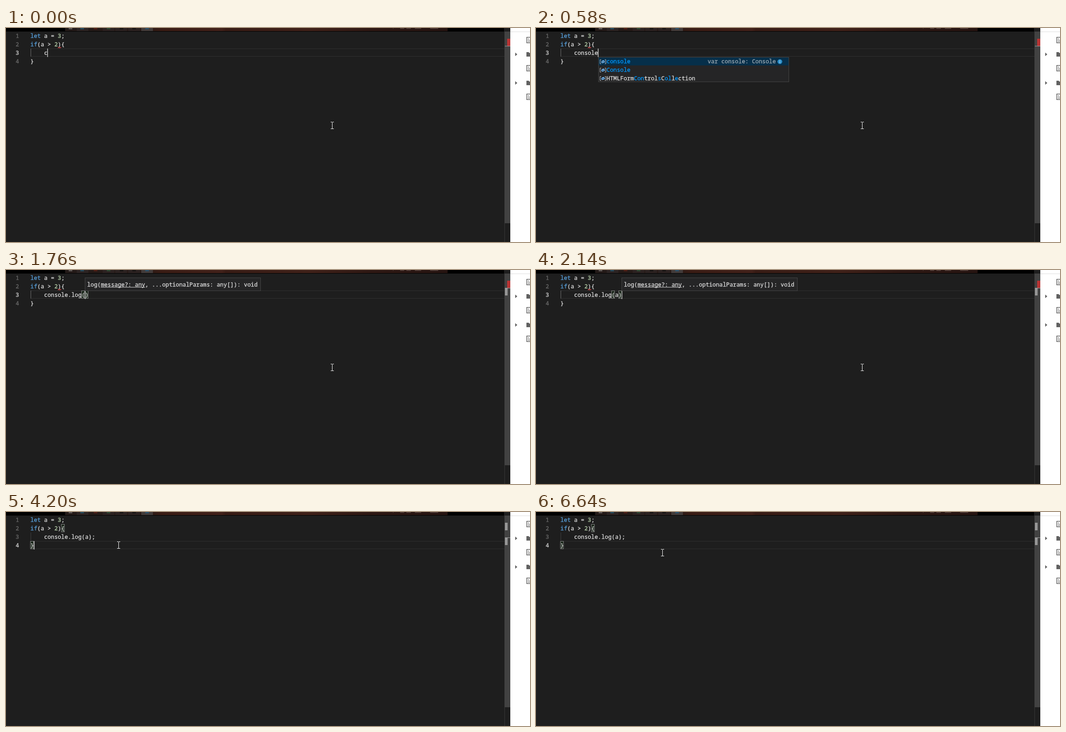
These frames come from a looping animation (1170 by 479 pixels, 7.08 s). An HTML page with a canvas:

```html
<!DOCTYPE html>
<html lang="en">
<head>
<meta charset="utf-8">
<title>Code editor</title>
<style>
html, body { margin: 0; width: 100%; height: 100%; overflow: hidden; background: #1e1e1e; }
canvas { display: block; }
</style>
</head>
<body>
<canvas id="stage" width="1170" height="479"></canvas>
<script>
const ctx = document.getElementById('stage').getContext('2d');
const LOOP = 7080, FRAME = 73.75;
const CODE = '12.7px "Noto Sans Mono", monospace';
const MENU = '11.45px "Open Sans", sans-serif';
const CHAR = 7.62, ROW = 19, TOP = 8, LEFT = 54.6;
const TEXT = '#dadada', BLUE = '#569cd6', NUMBER = '#b5cea8';

const colX = col => LEFT + col * CHAR;
const rowY = row => TOP + (row - 1) * ROW;

const globals = ('console const continue confirm case catch class clearInterval clearTimeout close closed ' +
  'caches Comment Console CompositionEvent ConvolverNode ConstantSourceNode CountQueuingStrategy ' +
  'HTMLFormControlsCollection').split(' ');
const members = 'assert clear count debug dir dirxml error exception group groupCollapsed groupEnd info log'.split(' ');
const locals = ('a alert addEventListener arguments atob async await Array ArrayBuffer ' +
  'AbortController Animation Attr Audio').split(' ');
const details = {
  console: 'var console: Console',
  assert: '(method) Console.assert(test?: boolean, message?: string): void',
  log: '(method) Console.log(message?: any, ...optionalParams: any[]): void',
  a: 'let a: number'
};

// Typed text over time; "|" marks a caret that is not at the end.
const typing = [
  [0, 'c'], [60, 'c', globals], [140, 'co', globals], [220, 'con', globals],
  [360, 'cons', globals], [440, 'conso', globals], [500, 'consol', globals],
  [580, 'console', globals], [960, 'console.'], [1020, 'console.', members],
  [1240, 'console.l', members], [1400, 'console.lo', members], [1460, 'console.log', members],
  [1620, 'console.log(|)'], [1700, 'console.log(|)', null, true],
  [1840, 'console.log(a|)', null, true], [1920, 'console.log(a|)', locals, true],
  [2060, 'console.log(a)', null, true], [2360, 'console.log(a);']
];

const menuItems = [
  [89, 'Save code', 'Ctrl+S'], [118.7, 'Switch theme', ''], [148.4, 'Go to Definition', 'Ctrl+F12'],
  [178.2, 'Peek Definition', 'Alt+F12'], [208, 'Find All References', 'Shift+F12'],
  [237.8, 'Go to Symbol...', 'Ctrl+Shift+O'], [259.5], [282.4, 'Change All Occurrences', 'Ctrl+F2'],
  [312.2, 'Format Document', 'Shift+Alt+F'], [333.5], [356.7, 'Cut', ''], [386.5, 'Copy', ''],
  [408.5], [431.2, 'Command Palette', 'F1']
];

function rect(x, y, w, h, color) {
  ctx.fillStyle = color;
  ctx.fillRect(x, y, w, h);
}

function frame(x, y, w, h, color) {
  ctx.strokeStyle = color;
  ctx.lineWidth = 1;
  ctx.strokeRect(x + .5, y + .5, w - 1, h - 1);
}

// A hairline stroke gives the glyphs the weight of hinted screen text.
function text(str, x, y, color = TEXT, font = CODE, align = 'left') {
  ctx.font = font;
  ctx.fillStyle = ctx.strokeStyle = color;
  ctx.textAlign = align;
  ctx.lineWidth = .35;
  ctx.fillText(str, x, y);
  ctx.strokeText(str, x, y);
}

function poly(points, fill, stroke, width = 1) {
  ctx.beginPath();
  points.forEach(([x, y]) => ctx.lineTo(x, y));
  if (fill) {
    ctx.closePath();
    ctx.fillStyle = fill;
    ctx.fill();
  }
  if (stroke) {
    ctx.strokeStyle = stroke;
    ctx.lineWidth = width;
    ctx.stroke();
  }
}

function codeLine(row, ...tokens) {
  let col = 0;
  for (const [str, color] of tokens) {
    text(str, colX(col), rowY(row) + 14, color);
    col += str.length;
  }
}

// Letters of word matched by query, starting at a word boundary; null if none.
function fuzzy(word, query) {
  const lower = word.toLowerCase();
  for (let start = 0; start < word.length; start++) {
    if (start && !/[A-Z]/.test(word[start])) continue;
    if (query && lower[start] !== query[0]) continue;
    const hits = new Set();
    let at = start - 1;
    for (const ch of query) {
      at = lower.indexOf(ch, at + 1);
      if (at < 0) break;
      hits.add(at);
    }
    if (hits.size === query.length) return hits;
  }
  return null;
}

function variableIcon(x, y) {
  poly([[x + 3, y - 4.5], [x + .5, y - 4.5], [x + .5, y + 4.5], [x + 3, y + 4.5]], null, '#c5c5c5');
  poly([[x + 11, y - 4.5], [x + 13.5, y - 4.5], [x + 13.5, y + 4.5], [x + 11, y + 4.5]], null, '#c5c5c5');
  poly([[x + 3, y - 1], [x + 8, y - 3.5], [x + 11.5, y - 1.5], [x + 11.5, y + 1], [x + 6, y + 3.5], [x + 3, y + 1.5]], '#75beff');
  poly([[x + 3.5, y - .5], [x + 6.5, y + .8], [x + 11, y - 1.2]], null, '#1e1e1e');
}

function methodIcon(x, y) {
  const hex = [[7, -6], [12, -3], [12, 3], [7, 6], [2, 3], [2, -3], [7, -6]];
  poly(hex.map(([dx, dy]) => [x + dx, y + dy]), null, '#b180d7', 1.4);
  poly([[x + 2, y - 3], [x + 7, y], [x + 12, y - 3]], null, '#b180d7', 1.4);
  poly([[x + 7, y], [x + 7, y + 6]], null, '#b180d7', 1.4);
}

function suggestions(words, query, x) {
  const rowH = 18.75, y = 65;
  const rows = words.map(word => [word, fuzzy(word, query)]).filter(r => r[1]).slice(0, 12);
  const height = Math.round(rows.length * rowH);
  rect(x, y, 426, height, '#252526');
  rect(x, y, 426, rowH, '#062f4a');
  frame(x, y, 426, height, '#454545');
  rows.forEach(([word, hits], i) => {
    const mid = y + 10 + i * rowH;
    (words === members ? methodIcon : variableIcon)(x + 3.5, mid + .5);
    [...word].forEach((ch, k) => text(ch, x + 18.6 + k * CHAR, mid + 4.3, hits.has(k) ? '#0097fb' : TEXT));
  });
  let detail = details[rows[0][0]];
  const room = Math.floor((396 - 30 - rows[0][0].length * CHAR) / CHAR);
  if (detail.length > room) detail = detail.slice(0, room - 1) + '…';
  text(detail, x + 396.5, y + 14.3, '#9aa7b0', CODE, 'right');
  ctx.beginPath();
  ctx.arc(x + 405.5, y + 10.2, 5.3, 0, 7);
  ctx.fillStyle = '#2d8fc9';
  ctx.fill();
  rect(x + 405, y + 7, 1, 1.5, '#d8ecf8');
  rect(x + 405, y + 9.5, 1, 4, '#d8ecf8');
}

function signature(x) {
  rect(x, 17, 393, 30, '#252526');
  frame(x, 17, 393, 30, '#454545');
  text('log(message?: any, ...optionalParams: any[]): void', x + 5.2, 37);
  rect(x + 5.2 + 4 * CHAR, 38, 13 * CHAR, 1, TEXT);
}

function bracketBox(col, row) {
  const x = Math.floor(colX(col));
  rect(x, rowY(row), 8, 18, 'rgba(0,100,0,.12)');
  frame(x, rowY(row), 8, 18, '#888');
}

function taskbar() {
  rect(0, 0, 1112, 8, '#000');
  const glow = ctx.createLinearGradient(132, 0, 986, 0);
  [[0, '#231a18'], [.22, '#2a1b17'], [.25, '#3a1c14'], [.41, '#42211a'], [.42, '#381c15'], [.64, '#402119'], [.8, '#2e1813'], [1, '#261411']]
    .forEach(([at, color]) => glow.addColorStop(at, color));
  rect(132, 0, 854, 7, glow);
  [[158, '#2c2423'], [216, '#2c2221'], [244, '#2c2221'], [273, '#2c2221'], [302, '#423b3a']]
    .forEach(([x, color]) => rect(x, 0, 26, 7, color));
  [[140, '#5c5553'], [166, '#24485a'], [196, '#4c1d13'], [225, '#2d4530'], [254, '#161312'], [282, '#161312'], [311, '#2c4f68']]
    .forEach(([x, color]) => rect(x, 0, 8, 3, color));
  [[864, 1], [880, 9], [894, 10], [913, 14], [947, 18]]
    .forEach(([x, w]) => rect(x, 0, w, 2, '#4f3b36'));
}

function fileTree() {
  const gray = '#616161';
  rect(1126, 0, 44, 479, '#fff');
  rect(1126, 8, 44, 1, '#ddd');
  for (const y of [20, 83, 147]) {
    ctx.strokeStyle = gray;
    ctx.lineWidth = 1.5;
    ctx.strokeRect(1162.75, y + .75, 11, 12.5);
    rect(1165, y + 4, 3, 1, gray);
    rect(1165, y + 7, 5, 1, gray);
    rect(1165, y + 10, 5, 1, gray);
  }
  for (const y of [59, 123]) {
    poly([[1137, y - 4], [1141.5, y], [1137, y + 4]], gray);
    poly([[1162, y - 5], [1167, y - 5], [1169, y - 3], [1175, y - 3], [1175, y + 5], [1162, y + 5]], gray);
  }
}

function scrollbar(row, marks, error) {
  rect(1113, 8, 13, 429, '#424242');
  rect(1113, 437, 1, 42, '#383838');
  if (error) rect(1119, 24, 7, 16, '#b83434');
  marks.forEach(y => rect(1114, y, 6, 17, '#969696'));
  rect(1114, row === 3 ? 40 : 57, 12, 1, '#a0a0a0');
}

function contextMenu(hover) {
  ctx.save();
  ctx.shadowColor = '#000';
  ctx.shadowBlur = 7;
  ctx.shadowOffsetY = 2;
  rect(252, 73, 212, 372, '#3c3c3c');
  ctx.restore();
  if (hover) rect(252, 73, 212, 30, '#094771');
  for (const [y, label, keys] of menuItems) {
    if (!label) {
      rect(262, Math.floor(y), 192, 1, '#6c6c6c');
      continue;
    }
    text(label, 264, y + 4, '#fff', MENU);
    text(keys, 452, y + 4, '#fff', MENU, 'right');
  }
}

function ibeam(x, y) {
  x = Math.round(x);
  y = Math.round(y);
  rect(x, y - 7, 1, 15, '#fff');
  for (const dy of [-8, 7]) {
    rect(x - 3, y + dy, 3, 1, '#fff');
    rect(x + 1, y + dy, 3, 1, '#fff');
  }
}

function hand(x, y) {
  ctx.lineJoin = 'round';
  const shape = [[-1, 1], [.5, -1], [2, 1], [2, 8], [4, 7], [5.5, 8.5], [7, 8], [8, 9.5], [9.5, 9.5],
    [10, 11], [9.5, 16], [8, 19], [8, 22], [-1, 22], [-1, 20], [-6, 14], [-5.5, 12], [-3.5, 12], [-1, 14], [-1, 1]];
  poly(shape.map(([dx, dy]) => [x + dx, y + dy]), '#fff', '#111');
  for (const dx of [2, 4.5, 7]) poly([[x + dx, y + 9], [x + dx, y + 12]], null, '#777', .8);
}

const ease = (t, from, to) => {
  const p = Math.min(1, Math.max(0, (t - from) / (to - from)));
  return p * p * (3 - 2 * p);
};

function pointer(t) {
  const held = Math.floor((t + 10) / FRAME) * FRAME;
  const approach = ease(held, 3170, 3950), settle = ease(held, 4590, 5110);
  return [728 - 477 * approach + 31 * settle, 218 - 144 * approach ** .83 + 17 * settle];
}

function caretVisible(t) {
  return t < 2860 || (t >= 3380 && t < 3900) || (t >= 4200 && t < 4280) || (t >= 6180 && t < 6640);
}

function draw(t) {
  const [, typed, list, help] = typing.findLast(step => step[0] <= t);
  const before = typed.split('|')[0], line = typed.replace('|', '');
  const row = t < 4200 ? 3 : 4;
  const caretCol = row === 3 ? 4 + before.length : 1;
  const caretX = Math.floor(colX(caretCol));
  const paired = line.endsWith(')');
  const error = t < 2200;
  const menuOpen = t >= 4280 && t < 6120;

  rect(0, 0, 1170, 479, '#1e1e1e');
  taskbar();
  fileTree();

  rect(55, rowY(row), 1058, 1, '#303030');
  rect(55, rowY(row) + 17, 1058, 1, '#303030');
  rect(55, 46, 1, 18, row === 3 ? '#707070' : '#404040');
  for (let n = 1; n <= 4; n++) {
    text(n, 29, rowY(n) + 14, n === row ? '#d0d0d0' : '#686868', CODE, 'right');
  }

  if (row === 4) {
    bracketBox(9, 2);
    bracketBox(0, 4);
  } else if (paired) {
    bracketBox(4 + line.indexOf('('), 3);
    bracketBox(4 + line.indexOf(')'), 3);
  }
  codeLine(1, ['let', BLUE], [' a = ', TEXT], ['3', NUMBER], [';', TEXT]);
  codeLine(2, ['if', BLUE], ['(a > ', TEXT], ['2', NUMBER], ['){', TEXT]);
  codeLine(3, ['    ' + line, TEXT]);
  codeLine(4, ['}', TEXT]);
  if (error) poly([[116, 45], [118, 43], [120, 45], [122, 43], [123, 44]], null, '#f14c4c', 1.2);

  scrollbar(row, row === 4 ? [24, 57] : paired ? [40] : [], error);
  if (caretVisible(t)) rect(caretX, rowY(row), 1.5, 19, '#c8c8c8');
  if (list) suggestions(list, before.match(/\w*$/)[0], caretX + 1);
  if (help) signature(caretX);

  if (menuOpen) contextMenu(t >= 4640);
  const [x, y] = pointer(t);
  (menuOpen ? hand : ibeam)(x, y);
}

function tick() {
  draw(performance.now() % LOOP);
  requestAnimationFrame(tick);
}
tick();
</script>
</body>
</html>
```
